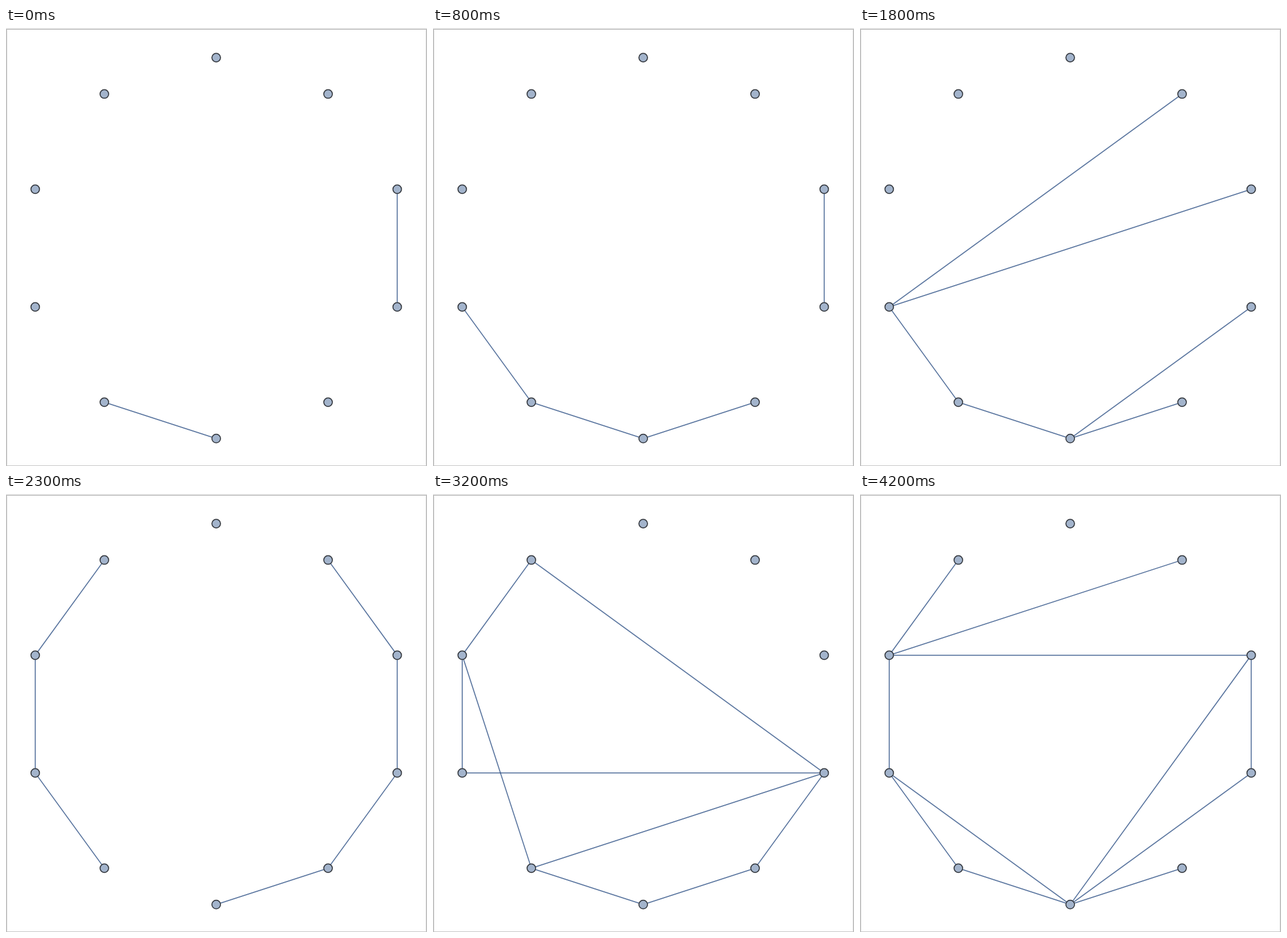
Write an HTML page with a canvas that moves like this. It is 734 px wide and 763 px high and loops after 4500 ms.

```html
<!DOCTYPE html>
<html lang="en">
<head>
<meta charset="utf-8">
<title>Graphs on a circle</title>
<style>
html, body { margin: 0; width: 100%; height: 100%; overflow: hidden; background: #fff; }
canvas { display: block; }
</style>
</head>
<body>
<canvas id="stage" width="734" height="763"></canvas>
<script>
const ctx = document.getElementById('stage').getContext('2d');
const LOOP = 4500;
const CX = 366.5, CY = 383.4, R = 331.8;

// Ten nodes, clockwise from the top: 0 top, 5 bottom.
const nodes = Array.from({ length: 10 }, (_, i) => {
  const a = i * Math.PI / 5 - Math.PI / 2;
  return [CX + R * Math.cos(a), CY + R * Math.sin(a)];
});

// Start time and edges; each pair of digits joins two nodes.
const steps = [
  [0, '23 56'],
  [300, '78 67 45'],
  [800, '23 67 56 45'],
  [1300, '98 86 76 54 64'],
  [1800, '17 27 67 56 45 35'],
  [2300, '98 87 76 54 43 32 21'],
  [2700, '01 98 87 86 95 54 43 32'],
  [3200, '98 93 87 86 73 63 65 54 43'],
  [3700, '98 87 96 06 16 26 24 34 65 54'],
  [4200, '98 18 28 87 23 25 76 75 65 35 45']
];

function drawEdge([a, b]) {
  ctx.beginPath();
  ctx.moveTo(...nodes[a]);
  ctx.lineTo(...nodes[b]);
  ctx.stroke();
}

function drawNode([x, y]) {
  ctx.beginPath();
  ctx.arc(x, y, 7.5, 0, Math.PI * 2);
  ctx.fill();
  ctx.stroke();
}

function drawFrame() {
  ctx.fillStyle = '#c2c2c2';
  ctx.fillRect(0, 1, 734, 2);
  ctx.fillRect(0, 1, 2, 762);
  ctx.fillRect(732, 1, 2, 762);
  ctx.fillRect(0, 762, 734, 1);
}

function draw(time) {
  const [, edges] = steps.findLast(([start]) => start <= time);
  ctx.fillStyle = '#fff';
  ctx.fillRect(0, 0, 734, 763);
  drawFrame();
  ctx.lineWidth = 1.75;
  ctx.strokeStyle = 'rgba(38, 74, 128, 0.75)';
  edges.split(' ').forEach(drawEdge);
  ctx.lineWidth = 1.75;
  ctx.fillStyle = '#a3b4cc';
  ctx.strokeStyle = '#363a40';
  nodes.forEach(drawNode);
}

function tick() {
  draw(performance.now() % LOOP);
  requestAnimationFrame(tick);
}
tick();
</script>
</body>
</html>
```
